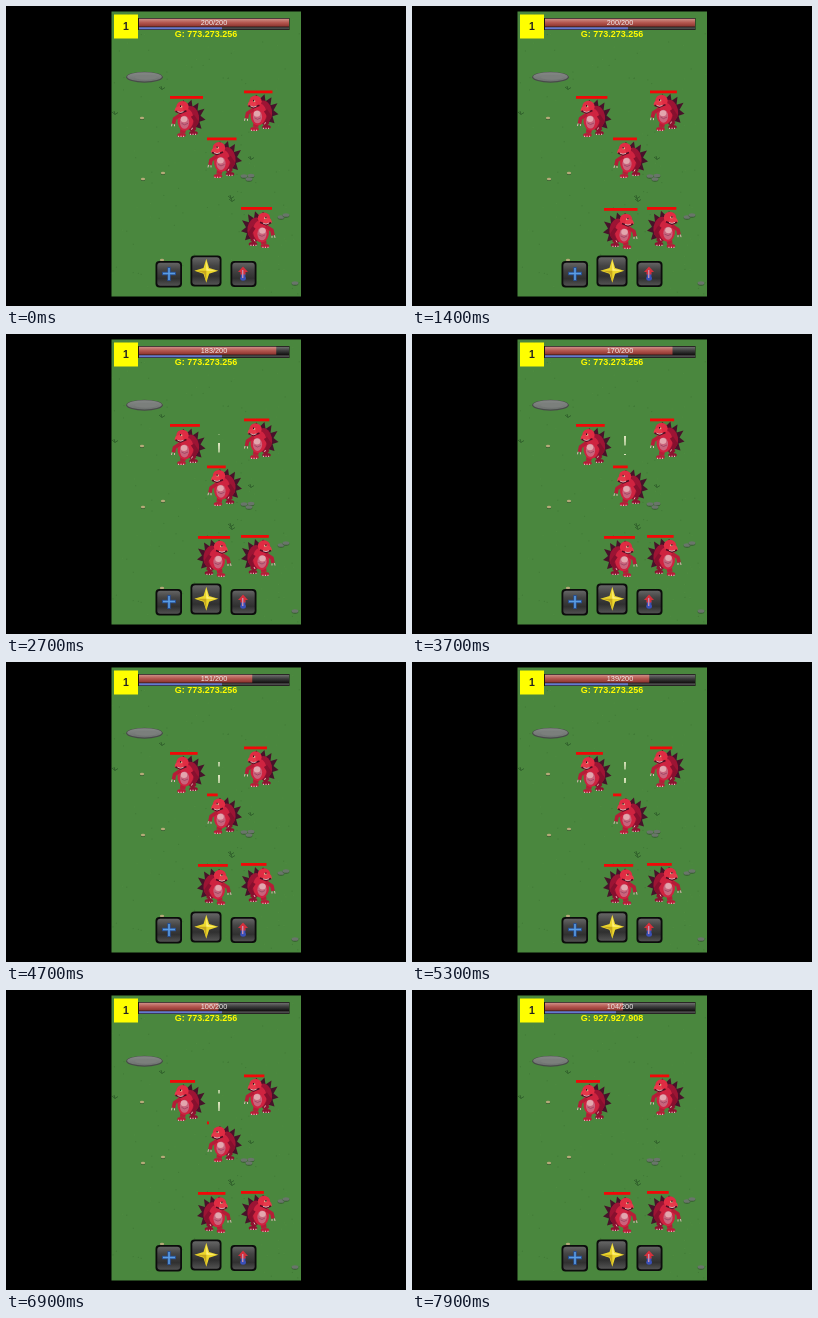
Animation, 400 px wide and 300 px high, one loop 8000 ms. Source, as an HTML page with a canvas:

```html
<!DOCTYPE html>
<html lang="en">
<head>
<meta charset="utf-8">
<title>Monster field</title>
<style>
html, body { margin: 0; width: 100%; height: 100%; overflow: hidden; background: #000; }
canvas { display: block; width: 400px; height: 300px; }
</style>
</head>
<body>
<canvas id="stage" width="400" height="300"></canvas>
<script>
const c = document.getElementById('stage').getContext('2d');
const LOOP = 8000, TICK = 100, DEATH = 7200;
const FONT = '"Liberation Sans", Arial, sans-serif';

const monsters = [
  { x: 180.5, y: 112, bar: [164, 90], width: 33, loss: 1.15, flip: 1 },
  { x: 253.5, y: 106, bar: [238, 84.5], width: 28.5, loss: 1.18, flip: 1 },
  { x: 217, y: 153, bar: [201, 131.5], width: 29.5, loss: 4, flip: 1, dies: DEATH },
  { x: 254, y: 223, bar: [235, 201], width: 31, loss: 1.18, flip: -1 },
  { x: 210, y: 224, bar: [192, 202], width: 35, loss: 1.1, flip: -1, born: 700 }
];

// [ms, hit points]
const hpKeys = [[0, 200], [1700, 200], [2700, 183], [3700, 170], [4700, 151], [6000, 124], [7000, 104], [LOOP, 104]];

function hpAt(t) {
  const i = hpKeys.findIndex(k => k[0] > t);
  const [t0, a] = hpKeys[i - 1], [t1, b] = hpKeys[i];
  return Math.round(a + (b - a) * (t - t0) / (t1 - t0));
}

function rect(x, y, w, h, fill) {
  c.fillStyle = fill;
  c.fillRect(x, y, w, h);
}

function oval(x, y, rx, ry, fill, turn = 0) {
  c.fillStyle = fill;
  c.beginPath();
  c.ellipse(x, y, rx, ry, turn, 0, Math.PI * 2);
  c.fill();
}

function poly(points, fill) {
  c.fillStyle = fill;
  c.beginPath();
  for (let i = 0; i < points.length; i += 2) c.lineTo(points[i], points[i + 1]);
  c.closePath();
  c.fill();
}

function line(points, color, width) {
  c.strokeStyle = color;
  c.lineWidth = width;
  c.beginPath();
  for (let i = 0; i < points.length; i += 2) c.lineTo(points[i], points[i + 1]);
  c.stroke();
}

function shade(y, h, ...colors) {
  const g = c.createLinearGradient(0, y, 0, y + h);
  colors.forEach((s, i) => g.addColorStop(i / (colors.length - 1), s));
  return g;
}

function text(str, x, y, font, fill) {
  c.font = font + ' ' + FONT;
  c.fillStyle = fill;
  c.textAlign = 'center';
  c.textBaseline = 'middle';
  c.fillText(str, x, y);
}

function pebble(x, y, r, fill) {
  oval(x, y + 0.8, r, r * 0.55, '#35592f');
  oval(x, y, r, r * 0.55, fill);
}

function tuft(x, y) {
  line([x - 3, y - 1, x, y + 1.5, x - 1, y - 2], '#2f5e2b', 0.9);
  line([x, y + 1.5, x + 3, y - 0.5], '#2f5e2b', 0.9);
}

function drawField() {
  rect(0, 0, 400, 300, '#000');
  rect(105.5, 5.5, 189.5, 285, '#4a873e');
  let seed = 7;
  const rnd = () => (seed = seed * 16807 % 2147483647) / 2147483647;
  for (let i = 0; i < 160; i++) {
    rect(106 + rnd() * 188, 6 + rnd() * 283, 1, 1, i % 2 ? 'rgba(35,80,30,.22)' : 'rgba(110,165,85,.18)');
  }
  for (const [x, y] of [[109, 107], [156, 82], [225, 191], [226, 194], [245, 152]]) tuft(x, y);
  for (const [x, y] of [[136, 112], [137, 173], [157, 167], [156, 254]]) pebble(x, y, 2.2, '#b5aa78');
  for (const [x, y] of [[238, 170], [245, 169.5], [243, 173], [275, 211], [280, 209], [289, 277]]) pebble(x, y, 3.4, '#69756a');
  oval(138.5, 71.2, 18.3, 5.5, '#484b49');
  oval(138.5, 70.8, 17.3, 4.6, shade(66, 10, '#858886', '#6c706e'));
  oval(140, 71.3, 11, 2.4, '#7b7f7c');
}

function drawLeg(x, y, footX, footY, color) {
  line([x, y, footX + 1, footY - 2], color, 5.5);
  oval(footX, footY, 4.3, 2, color);
  for (const d of [-3.5, -1, 1.5]) rect(footX + d, footY + 0.7, 1.1, 1.3, '#dcb7b5');
}

function drawMonster(m, t) {
  const sway = Math.sin((t + m.x * 13) / 800 * Math.PI * 2) * 0.5;
  c.save();
  c.translate(m.x, m.y);
  c.scale(m.flip, 1);
  c.lineJoin = 'round';
  drawLeg(4, 9, 7, 15, '#8d1230');
  drawLeg(-3, 10, -5, 17, '#b81c38');
  c.translate(0, sway);
  poly([-7, -14, -3, -17.5, 0, -13, 5, -18, 6, -11, 12, -15, 11, -7, 18, -9,
    14, -2, 19, 2, 13, 4, 15, 11, 8, 9, 0, 2], '#47122a');
  oval(5, -1, 7.5, 11, '#9c1434', -0.2);
  oval(-1, 2, 8, 11, '#cf2340', 0.1);
  line([6, -2, 10, 4, 7, 10], '#86102e', 3.8);
  oval(-2, 4.5, 4.6, 6.5, '#c9647c');
  oval(-2.5, 1.5, 3.3, 3, '#e3a6ae');
  line([-5, 5.5, -2, 7, 1.5, 5.5], '#994561', 0.8);
  line([-6, -3, -12, 1, -13, 6], '#b51d37', 3.6);
  line([-14.5, 6, -15, 8.5], '#ddb8b4', 1);
  line([-12, 6.5, -12, 8.5], '#ddb8b4', 1);
  line([6, 10, 5, 12], '#ddb8b4', 1);
  oval(-4, -11, 6.2, 5.8, '#e02c43');
  poly([-5, -13, -11, -10, -12, -7, -8, -4, -2, -5], '#e63a4b');
  line([-11, -6.5, -6, -4.5, 0, -7], '#520d24', 1.6);
  line([-9, -6.3, -6, -5.3, -3, -6.2], '#f0cfcd', 0.8);
  rect(-6.5, -12, 2.2, 1.6, '#f2cfa5');
  rect(-6.5, -12.5, 1.2, 1.7, '#320b18');
  c.restore();
  const w = m.width - m.loss * t / 1000;
  if (w > 0) rect(m.bar[0], m.bar[1], w, 2.8, '#f20808');
}

// A stream of dashes rising through a short window.
function drawShot(t) {
  if (t < 1900 || t >= DEATH) return;
  const top = 100, bottom = 121, gap = 18, length = 9.5;
  const shift = (t - 2700) * 0.025 % gap;
  c.save();
  c.beginPath();
  c.rect(210, top, 6, bottom - top);
  c.clip();
  for (let y = 109 - gap - shift; y < bottom; y += gap) {
    poly([212, y, 214, y, 213.6, y + length, 212.4, y + length], '#e3e9c4');
  }
  c.restore();
}

function button(x, y, size) {
  c.beginPath();
  c.roundRect(x, y, size, size, 4);
  c.fillStyle = '#0c0c0c';
  c.fill();
  c.beginPath();
  c.roundRect(x + 1.8, y + 1.8, size - 3.6, size - 3.6, 3);
  c.fillStyle = shade(y, size, '#6c6c6c', '#444', '#303030', '#5a5a5a');
  c.fill();
}

function drawButtons() {
  button(149.5, 255, 26.5);
  line([163, 261, 163, 275], '#284f91', 3.4);
  line([156, 267.5, 170, 267.5], '#284f91', 3.4);
  line([163, 262, 163, 274], '#5a9de4', 1.6);
  line([157, 267.5, 169, 267.5], '#5a9de4', 1.6);

  button(184.5, 249.5, 31);
  const star = [];
  for (let i = 0; i < 8; i++) {
    const r = i % 2 ? 4 : 12, a = i * Math.PI / 4;
    star.push(200.3 + Math.sin(a) * r, 264.8 - Math.cos(a) * r);
  }
  poly(star, '#ecd72c');
  poly([200.3, 254, 202, 263, 210, 264.8, 200.3, 264.8], '#fff07a');
  poly([200.3, 264.8, 200.3, 276, 198, 267, 190, 264.8], '#c6a61f');

  button(224.5, 255, 26);
  rect(234.8, 267, 4.6, 6, '#3a50b8');
  oval(237.1, 272.5, 2.8, 2.2, '#3a50b8');
  poly([237, 260.5, 242, 266, 239.5, 266, 239.5, 268.5, 234.5, 268.5, 234.5, 266, 232, 266], '#d5303c');
  rect(236, 264, 1.4, 8, '#c58fae');
}

function drawStatus(t) {
  const hp = hpAt(t), dead = t >= DEATH;
  rect(132, 12, 151.5, 12, '#191414');
  rect(133, 12.8, 150, 7.8, shade(12.8, 7.8, '#707070', '#3c3c3c', '#141414'));
  rect(133, 12.8, 150 * hp / 200, 7.8, shade(12.8, 7.8, '#d08f87', '#b3564f', '#8c332e'));
  rect(133, 21.3, 150, 2, '#4a4a4a');
  rect(133, 21.3, dead ? 71 : 83, 2, '#6578cf');
  text(hp + '/200', 208, 16.7, '7.3px', '#f0eaea');
  rect(108, 8.5, 24, 24, '#ffff00');
  text('1', 120, 20.8, 'bold 10.5px', '#222');
  text('G: ' + (dead ? '927.927.908' : '773.273.256'), 200, 28.5, 'bold 9px', '#fffb00');
}

function draw(now) {
  const t = Math.floor(now % LOOP / TICK) * TICK;
  drawField();
  for (const m of monsters) {
    if (t >= (m.born || 0) && t < (m.dies || LOOP)) drawMonster(m, t);
  }
  drawShot(t);
  drawButtons();
  drawStatus(t);
}

const start = performance.now();
function loop() {
  draw(performance.now() - start);
  requestAnimationFrame(loop);
}
loop();
</script>
</body>
</html>
```
